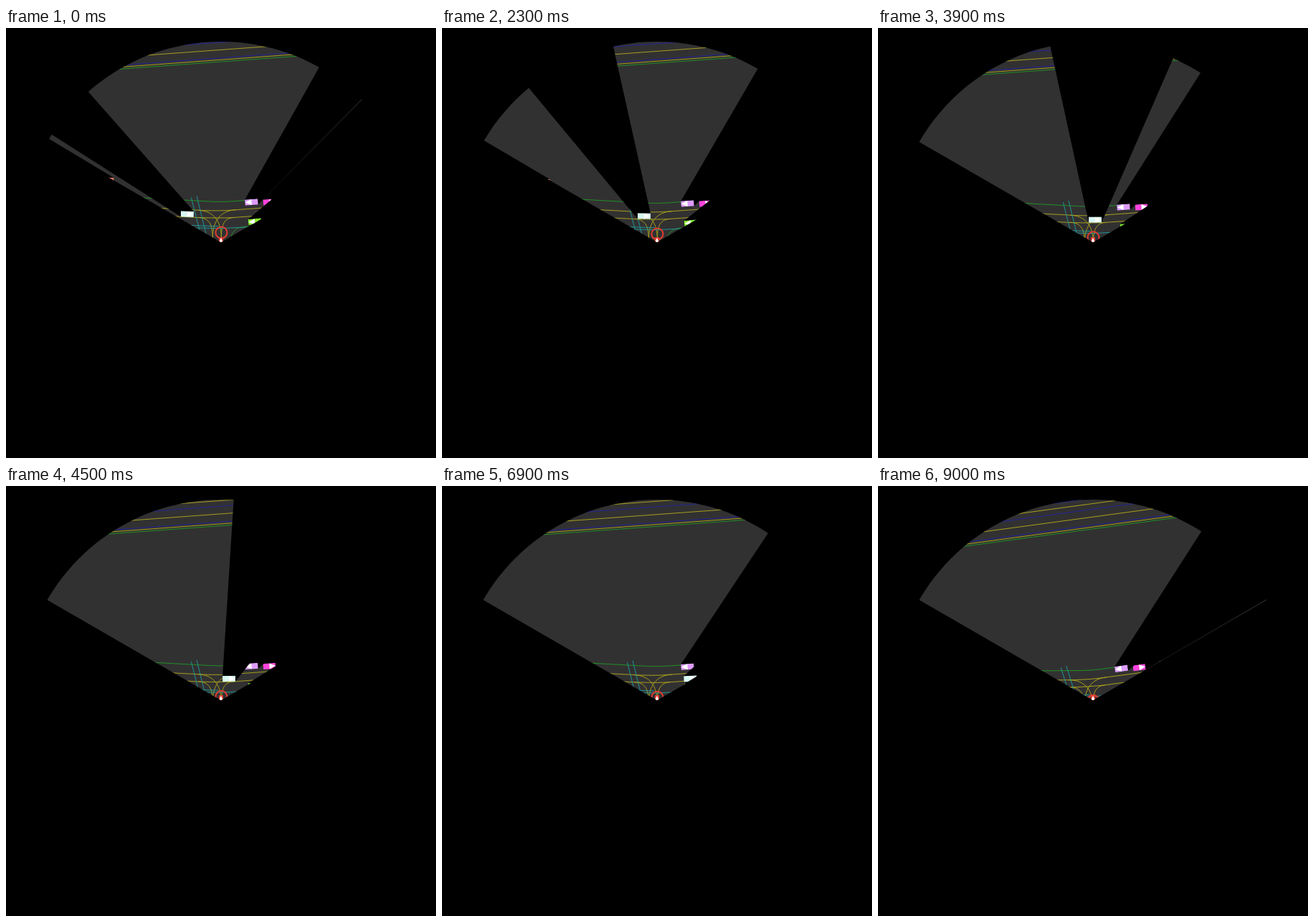
Recreate the animation shown at these times as an HTML page. Size 600x600 px, loop 9100 ms.

```html
<!DOCTYPE html>
<html lang="en">
<head>
<meta charset="utf-8">
<title>Field of view with occlusion</title>
<style>
html, body { margin: 0; width: 100%; height: 100%; overflow: hidden; background: #000; }
svg { display: block; width: 100vw; height: 100vh; }
.line { fill: none; stroke-width: 0.9; }
.green { stroke: #1f9a22; }
.yellow { stroke: #b2aa1a; }
.blue { stroke: #2323a0; }
.teal { stroke: #1f9f9f; }
</style>
</head>
<body>
<svg viewBox="0 0 600 600">
  <defs><clipPath id="view"><path id="sector"/></clipPath></defs>
  <g clip-path="url(#view)">
    <rect width="600" height="600" fill="#323132"/>
    <g id="world">
      <g id="roads" transform="translate(0.4 0.4)"></g>
      <circle cx="300.5" cy="285.4" r="8" fill="none" stroke="#e23c30" stroke-width="2"/>
      <g id="cars"></g>
    </g>
    <path d="M297 292h6v14h-6z" fill="#e23c30"/>
    <path d="M300 292.5L303 299.5H297z" fill="#fff"/>
  </g>
  <!-- Outside the clip, so that no lit fringe stays along the rim. -->
  <path id="shadows"/>
</svg>
<script>
const EYE = { x: 300, y: 299 }, RANGE = 280, HALF_ANGLE = Math.PI / 3;
const PIVOT = { x: 300, y: 289.7 };
const HALF_LENGTH = 9, HALF_WIDTH = 4;
const LOOP = 9100, STEP = 100;

const byId = id => document.getElementById(id);

function add(parent, tag, attributes) {
  const node = document.createElementNS("http://www.w3.org/2000/svg", tag);
  for (const key in attributes) node.setAttribute(key, attributes[key]);
  return parent.appendChild(node);
}

const reachX = RANGE * Math.sin(HALF_ANGLE), reachY = EYE.y - RANGE * Math.cos(HALF_ANGLE);
byId("sector").setAttribute("d",
  `M${EYE.x} ${EYE.y}L${EYE.x - reachX} ${reachY}A${RANGE} ${RANGE} 0 0 1 ${EYE.x + reachX} ${reachY}Z`);

const roads = byId("roads");
const line = (color, d) => add(roads, "path", { class: "line " + color, d });

// Distant highway: parallel lines given by their height at the centre.
for (const [color, y] of [["green", 46.6], ["blue", 41.3], ["yellow", 43.9], ["yellow", 30],
  ["blue", 19.3], ["yellow", 11.5], ["blue", 3.8]])
  line(color, `M0 ${y + 21.9}L600 ${y - 21.9}`);

// Crossing street and the lanes that join it.
line("green", "M150 234.3L285 241.7Q300 242.5 315 241.5L450 231.6");
line("yellow", "M150 247.6L275 254.2Q300 255 315 253.7L450 244");
line("yellow", "M150 258L270 264.2Q300 265 315 264.2L450 254.5");
line("yellow", "M268 254C288 254.5 300 268 300 292");
line("yellow", "M268 264C283 264.5 288 274 288 292");
line("yellow", "M320 253.4C300 254 288 268 288 292");
line("yellow", "M318 264C304 264.5 300 274 300 292");
line("green", "M313.5 300V292Q316 279 330 277L400 272");

// Pedestrian crossings.
line("teal", "M258 236L270.5 285");
line("teal", "M265.7 234L279 288");
line("teal", "M257 275L296 276.3");
line("teal", "M262 278.5L300 279.2L336 277.5");

const cars = [
  { color: "#dd9cff", x: 342.6, y: 242.9, angle: -0.073, heading: -1 },
  { color: "#ff44dd", x: 367.6, y: 242.9, angle: -0.073, heading: 1, halfLength: 8.6 },
  { color: "#86f52a", x: 347.2, y: 270.1, angle: -0.087, heading: -1 },
  { color: "#ea7464", x: 141.2, y: 212.5, angle: 0.055, heading: 1 },
  { color: "#f3f0ec", x: 388, y: 232.6, angle: -0.073, heading: -1 },
  { color: "#d8f8f2", heading: 1, drive(t) {
    this.x = 252.9 + 12.5 * t + 0.0225 * t ** 3;
    this.y = 260.6 - 0.0005 * (this.x - 298) ** 2;
    this.angle = -0.001 * (this.x - 298);
  } }
];
for (const car of cars) {
  const l = car.halfLength ??= HALF_LENGTH, w = HALF_WIDTH;
  car.node = add(byId("cars"), "g", {});
  add(car.node, "rect", { x: -l, y: -w, width: 2 * l, height: 2 * w, fill: car.color });
  add(car.node, "path", { d: `M0 ${-w}L${car.heading * l} 0L0 ${w}Z`, fill: "#fff" });
}

// Distance travelled: time, distance, speed.
const travel = [[0, 0, 0.1], [1.4, 0.6, 1], [3.2, 4.4, 3.2], [3.9, 6.9, 3.5],
  [5.2, 9.1, 0.1], [6.9, 9.3, 0.15], [8, 10.4, 2], [9, 14.4, 5.6]];

function distanceAt(t) {
  let i = 0;
  while (i < travel.length - 2 && t > travel[i + 1][0]) i++;
  const [t0, d0, v0] = travel[i], [t1, d1, v1] = travel[i + 1];
  const span = t1 - t0, u = (t - t0) / span, s = 1 - u;
  return s * s * ((1 + 2 * u) * d0 + u * span * v0) + u * u * ((3 - 2 * u) * d1 - s * span * v1);
}

const turnAt = t => 0.062 * (Math.max(0, t - 7.8) / 1.2) ** 2;

function rotate(x, y, angle) {
  const c = Math.cos(angle), s = Math.sin(angle);
  return [x * c - y * s, x * s + y * c];
}

// Car corners relative to the eye, clockwise from the top left.
function corners(car, distance, turn) {
  return [[-1, -1], [1, -1], [1, 1], [-1, 1]].map(([i, j]) => {
    const [cx, cy] = rotate(i * car.halfLength, j * HALF_WIDTH, car.angle);
    const [x, y] = rotate(car.x + cx - PIVOT.x, car.y + cy - PIVOT.y, -turn);
    return [x + PIVOT.x - EYE.x, y + PIVOT.y + distance - EYE.y];
  });
}

// Every edge that faces away from the eye throws a shadow behind it.
function shadow(points) {
  const at = ([x, y], k) => `${(EYE.x + k * x).toFixed(3)} ${(EYE.y + k * y).toFixed(3)}`;
  return points.map((a, i) => {
    const b = points[(i + 1) % 4];
    if (a[0] * b[1] - a[1] * b[0] <= 0) return "";
    return `M${at(a, 1)}L${at(b, 1)}L${at(b, 25)}L${at(a, 25)}Z`;
  }).join("");
}

const degrees = angle => angle * 180 / Math.PI;

function draw(t) {
  const distance = distanceAt(t), turn = turnAt(t);
  byId("world").setAttribute("transform",
    `translate(0 ${distance}) rotate(${-degrees(turn)} ${PIVOT.x} ${PIVOT.y})`);
  let path = "";
  for (const car of cars) {
    if (car.drive) car.drive(t);
    car.node.setAttribute("transform", `translate(${car.x} ${car.y}) rotate(${degrees(car.angle)})`);
    path += shadow(corners(car, distance, turn));
  }
  byId("shadows").setAttribute("d", path);
}

const start = performance.now();
function tick() {
  const elapsed = (performance.now() - start) % LOOP;
  draw(Math.floor(elapsed / STEP) * STEP / 1000);
  requestAnimationFrame(tick);
}
tick();
</script>
</body>
</html>
```
